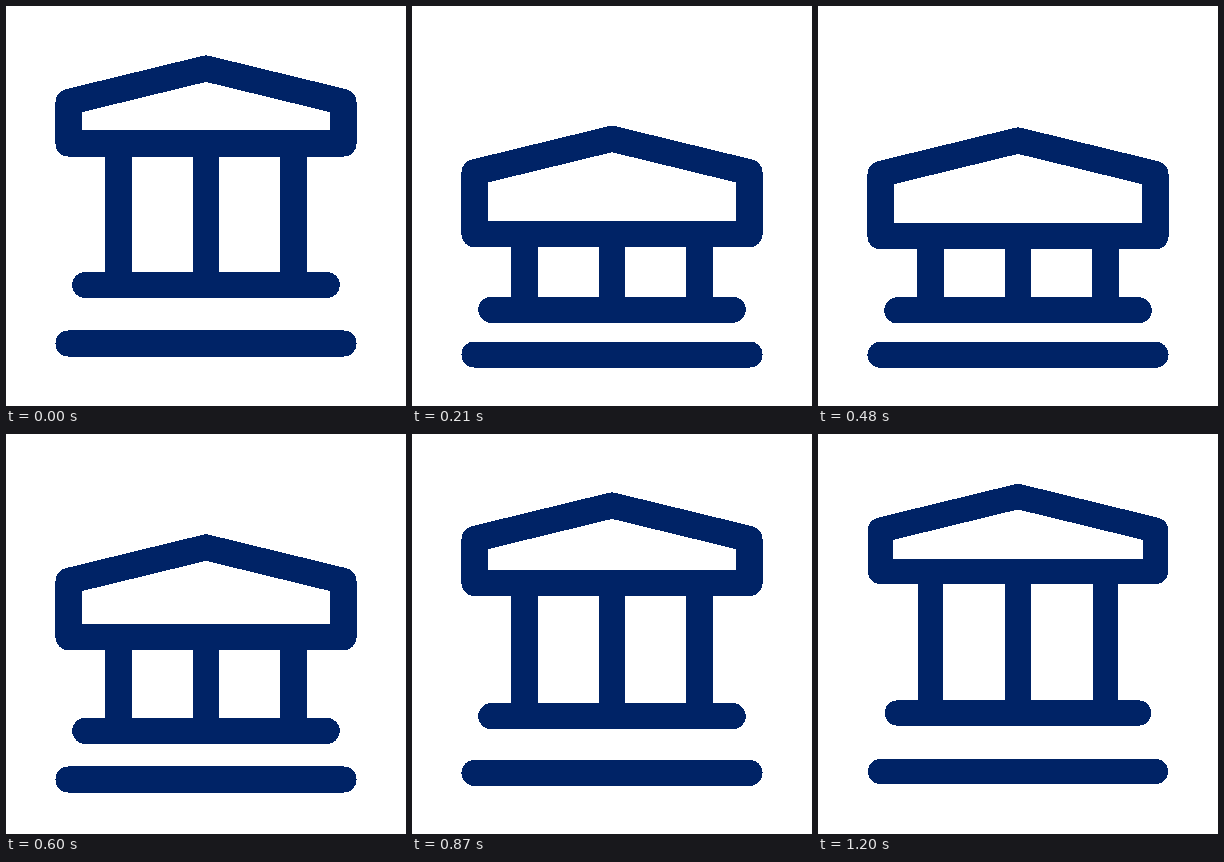
These frames come from a looping animation (400 px wide and 400 px high, 3230 ms). An HTML page:

```html
<!DOCTYPE html>
<html lang="en">
<head>
<meta charset="utf-8">
<title>Bank icon</title>
<style>
  html, body { margin: 0; height: 100%; overflow: hidden; background: #fff; }
  svg { display: block; width: 100%; height: 100%; }
  path {
    fill: none; stroke: #002366;
    stroke-linecap: round; stroke-linejoin: round;
    shape-rendering: crispEdges;
  }
</style>
</head>
<body>
<svg viewBox="0 0 400 400"><path id="bank"/></svg>
<script>
const LOOP = 3230, STEP = 30, PEAK = 300, END = 1200;
const bank = document.getElementById('bank');

// Cubic bezier easing with handles (a, 0) and (b, 1), solved by bisection
function ease(x, a, b) {
  let lo = 0, hi = 1, s = 0.5;
  for (let i = 0; i < 30; i++) {
    s = (lo + hi) / 2;
    const r = 1 - s;
    if (3 * r * r * s * a + 3 * r * s * s * b + s ** 3 < x) lo = s;
    else hi = s;
  }
  return s * s * (3 - 2 * s);
}

// 0 = standing tall, 1 = fully squashed
function squash(t) {
  if (t >= END) return 0;
  return t < PEAK
    ? ease(t / PEAK, 0.42, 0.42)
    : 1 - ease((t - PEAK) / (END - PEAK), 0.463, 0.231);
}

function draw(now) {
  const t = Math.min(END, Math.floor(now % LOOP / STEP) * STEP);
  const p = squash(t);
  const apex = 62.5 + 79.5 * p;
  const eave = apex + 33.5;
  const beam = 137.5 + 102.5 * p;
  const base = 279 + 28 * p;
  const ground = 337.5 + 12.5 * p;
  const columns = [112.5, 200, 287.5].map(x => `M${x} ${beam}V${base}`).join('');

  bank.setAttribute('stroke-width', t < END ? 26.1 : 25.2);
  bank.setAttribute('d',
    `M62.5 ${eave}L200 ${apex}L337.5 ${eave}V${beam}H62.5Z` + columns +
    `M79.3 ${base}H320.7M62.5 ${ground}H337.5`);
}

const start = performance.now();
function tick() {
  draw(performance.now() - start);
  requestAnimationFrame(tick);
}
tick();
</script>
</body>
</html>
```
